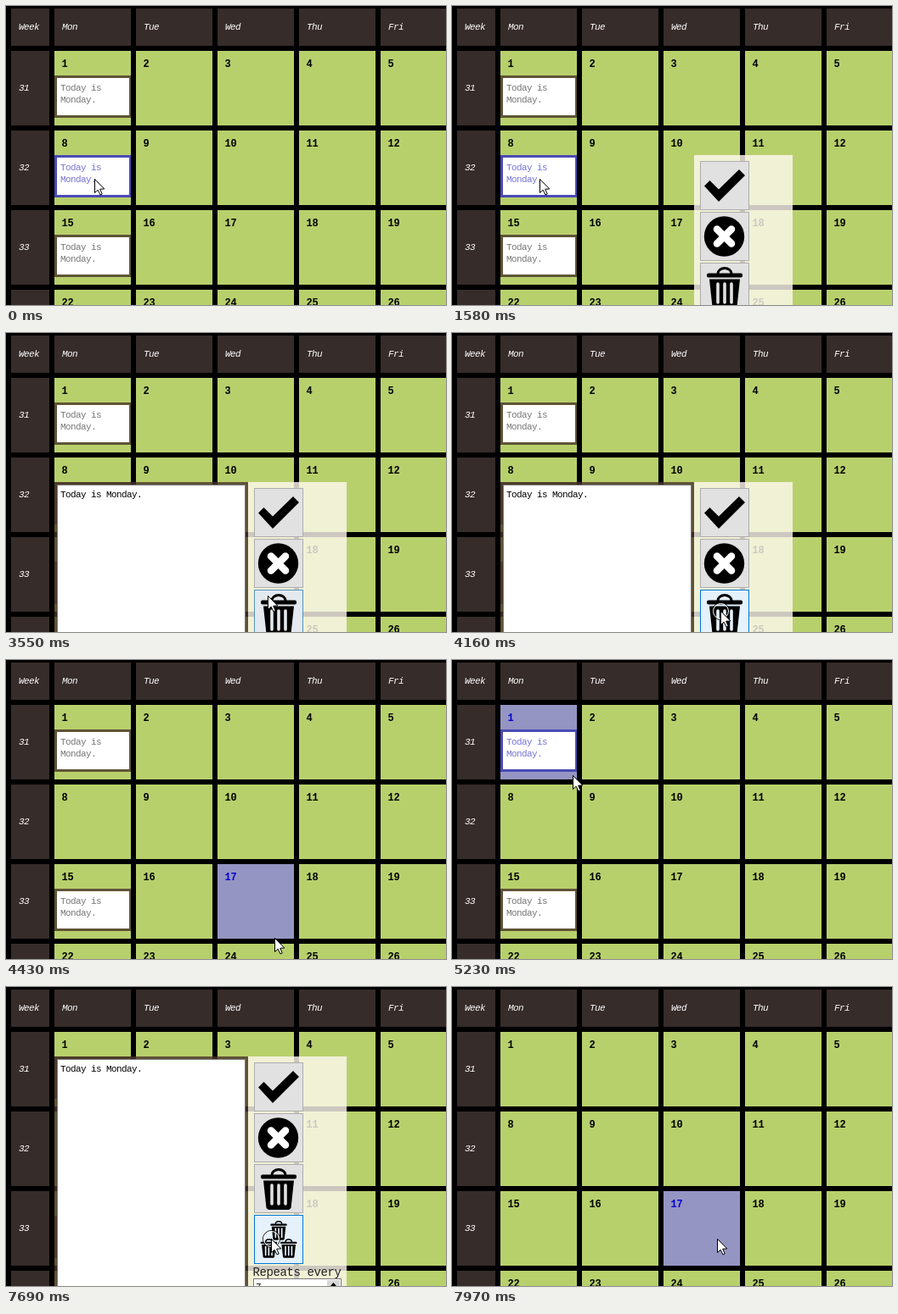
An HTML page with a canvas that plays this animation: 518x353 px, repeating every 8 s.

```html
<!DOCTYPE html>
<html lang="en">
<head>
<meta charset="utf-8">
<title>Calendar notes</title>
<style>
html, body { margin: 0; width: 518px; height: 353px; overflow: hidden; background: #000; }
canvas { display: block; }
</style>
</head>
<body>
<canvas id="stage" width="518" height="353"></canvas>
<script>
const g = document.getElementById('stage').getContext('2d');
const LOOP = 8000, TICK = 137;
const BROWN = '#5f5436', BLUE = '#4a4ab6', BLACK = '#000', GRAY = '#7a7a7a';

// Pointer key points: time, x, y, ease-out power of the move that ends there
const keys = [
  [0, 104, 204], [2450, 103, 204], [2970, 159, 203], [3400, 291, 296], [3550, 308, 310], [3850, 316, 328],
  [4580, 316, 328], [5230, 142, 136], [5620, 121, 112, 1.5],
  [6480, 120, 112], [6610, 140, 113], [7030, 289, 247], [7570, 312, 297, 1.5], [LOOP, 312, 297]
];
const clicks = [1280, 4160, 5930, 7690];
const CLICK_MS = 150;

const within = (t, a, b) => t >= a && t < b;
const inside = ([x, y], l, top, w, h) => within(x, l, l + w) && within(y, top, top + h);

// The pointer glides between key points but is only redrawn about once per tick.
function pointerAt(t) {
  const i = keys.findIndex(k => k[0] > t);
  const [t0, x0, y0] = keys[i - 1], [t1, x1, y1, power = 1] = keys[i];
  const steps = Math.round((t1 - t0) / TICK);
  const u = Math.floor((t - t0) / (t1 - t0) * steps) / steps;
  const k = 1 - (1 - u) ** power;
  return [Math.round(x0 + (x1 - x0) * k), Math.round(y0 + (y1 - y0) * k)];
}

function rect(color, x, y, w, h) {
  g.fillStyle = color;
  g.fillRect(x, y, w, h);
}

function text(s, x, y, color, font = '11px', spacing = -0.6) {
  g.font = font + ' "Liberation Mono", monospace';
  g.letterSpacing = spacing + 'px';
  g.fillStyle = color;
  g.fillText(s, x, y);
}

function polygon(points, color) {
  g.fillStyle = color;
  g.beginPath();
  points.forEach(p => g.lineTo(...p));
  g.closePath();
  g.fill();
}

function line(points, color, width) {
  g.strokeStyle = color;
  g.lineWidth = width;
  g.beginPath();
  points.forEach(p => g.lineTo(...p));
  g.stroke();
}

function disc(x, y, r) {
  g.beginPath();
  g.arc(x, y, r, 0, 7);
}

function at(x, y, scale, draw) {
  g.save();
  g.translate(x, y);
  g.scale(scale, scale);
  draw();
  g.restore();
}

function note(y, hot) {
  rect(hot ? BLUE : BROWN, 57, y, 90, 50);
  rect('#fff', 60, y + 3, 85, 44);
  ['Today is', 'Monday.'].forEach((s, i) => text(s, 64, y + 18 + 14 * i, hot ? '#7674d4' : '#777'));
}

function grid(t, pos) {
  rect(BLACK, 0, 0, 518, 353);
  ['Week', 'Mon', 'Tue', 'Wed', 'Thu', 'Fri'].forEach((name, i) => {
    const x = i ? 96 * i - 39 : 6;
    rect('#362c29', x, 3, i ? 90 : 45, 44);
    text(name, x + 9, 28, '#fff', 'italic 11px');
  });
  const canHover = !within(t, 1740, 4430) && !within(t, 6210, 7970);
  for (let r = 0; r < 4; r++) {
    const y = 53 + 94 * r;
    rect('#362c29', 6, y, 45, 88);
    text(String(31 + r), 15, y + 47, '#fff', 'italic 11px');
    for (let c = 0; c < 5; c++) {
      const x = 57 + 96 * c;
      const hasNote = c === 0 && r < 3 && t < (r === 1 ? 4430 : 7970);
      const over = canHover && inside(pos, x, y, 90, 88);
      const lit = over && !(hasNote && inside(pos, x, y + 29, 90, 50));
      rect(lit ? '#9595c3' : '#b8d06c', x, y, 90, 88);
      text(String(1 + 7 * r + c), x + 8.5, y + 19, lit ? '#0000d0' : BLACK, 'bold 12px', -0.2);
      if (hasNote) note(y + 29, over);
    }
  }
}

function bin(hole) {
  g.strokeStyle = BLACK;
  g.lineWidth = 3;
  g.beginPath();
  g.ellipse(29, 13, 8, 6.5, 0, Math.PI, 0);
  g.stroke();
  g.fillStyle = BLACK;
  g.beginPath();
  g.roundRect(8, 12.5, 42, 5, 2);
  g.fill();
  polygon([[11, 19.5], [47, 19.5], [43.5, 52], [41, 54], [17, 54], [14.5, 52]], BLACK);
  for (const x of [21, 29, 37]) line([[x, 25], [x, 47]], hole, 3.6);
}

const icons = [
  () => polygon([[5, 29.5], [11.5, 23], [22, 33.5], [46, 10], [53, 17], [22, 48]], BLACK),
  () => {
    disc(28.5, 29, 23.7);
    g.fillStyle = BLACK;
    g.fill();
    for (const d of [-8.5, 8.5]) line([[28.5 - d, 20.5], [28.5 + d, 37.5]], '#fff', 8.5);
  },
  bin,
  hole => [[15.7, 4.8], [4, 26], [27.4, 26]].forEach(([x, y]) => at(x, y, 0.46, () => bin(hole)))
];

function panel(y, now, before) {
  rect('rgba(255,250,240,.8)', 285, y, 116, 353);
  icons.forEach((icon, i) => {
    const top = y + 7 + 60 * i;
    const over = p => inside(p, 292, top, 58, 59);
    const level = over(now) ? 1 + over(before) : 0;
    const fill = ['#e1e1e1', '#e3e9ee', '#e5f1fb'][level];
    rect(['#adadad', '#5793c2', '#0078d7'][level], 292, top, 58, 58);
    rect(fill, 293, top + 1, 56, 56);
    at(292, top, 1, () => icon(fill));
  });
  text('Repeats every', 290.5, y + 259, '#222', '14px', -0.4);
  rect(GRAY, 291, y + 262, 104, 24);
  rect('#fff', 292, y + 263, 102, 22);
  text('7', 294, y + 275, BLACK);
  rect('#d8d8d8', 378, y + 264, 15, 10);
  polygon([[382, y + 271], [389, y + 271], [385.5, y + 267]], BLACK);
}

function editor(y) {
  rect('rgba(73,53,41,.8)', 57, y, 228, 353);
  rect(GRAY, 60, y + 3, 222, 353);
  rect('#fff', 61, y + 4, 220, 353);
  text('Today is Monday.', 64, y + 18, BLACK);
}

function pointer([x, y], pressed) {
  at(x + 0.5, y + 0.5, 1, () => {
    if (pressed) {
      g.lineWidth = 1;
      [BLACK, '#fff'].forEach((color, i) => {
        disc(0, 0, 10 - i);
        g.strokeStyle = color;
        g.stroke();
      });
    }
    const arrow = [[0, 0], [0, 16], [3.7, 12.7], [6.5, 18.5], [8.7, 17.5], [6.2, 11.7], [11.3, 11.5]];
    polygon(arrow, '#fff');
    line([...arrow, [0, 0]], BLACK, 1);
  });
}

function draw(t) {
  const now = pointerAt(t), before = pointerAt(Math.max(0, t - TICK));
  g.lineCap = 'round';
  grid(t, now);
  if (within(t, 1580, 4280)) panel(176, now, before);
  if (within(t, 1740, 4280)) editor(176);
  if (within(t, 6210, 7840)) {
    panel(82, now, before);
    editor(82);
  }
  pointer(now, clicks.some(c => within(t, c, c + CLICK_MS)));
}

function frame() {
  draw(performance.now() % LOOP);
  requestAnimationFrame(frame);
}
frame();
</script>
</body>
</html>
```
